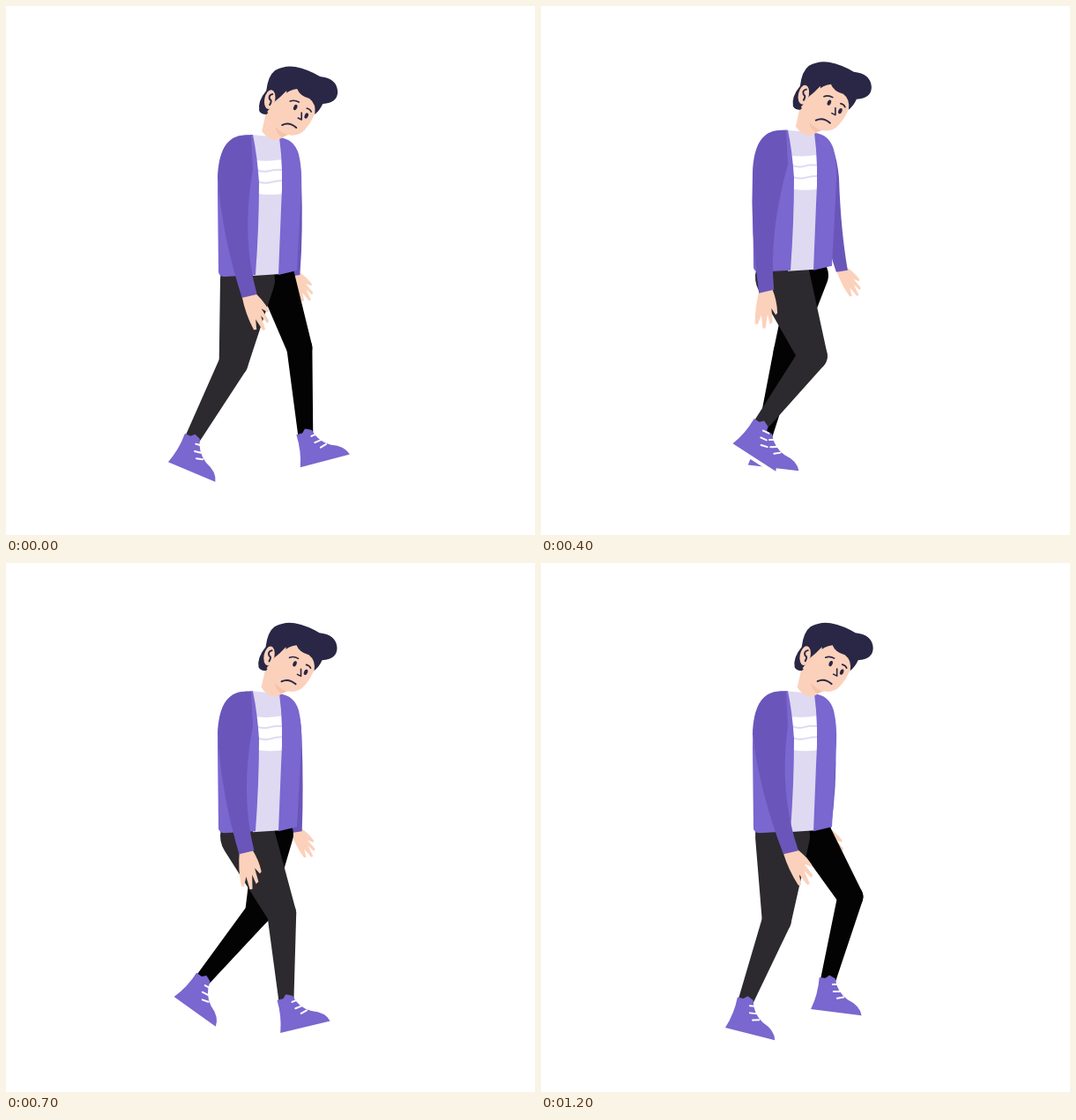
An HTML page with a canvas for the animation above (1300 ms loop, 600 by 600 pixels).

```html
<!DOCTYPE html>
<html lang="en">
<head>
<meta charset="utf-8">
<title>Weary walk</title>
<style>
html, body { margin: 0; width: 100%; height: 100%; overflow: hidden; background: #fff; }
canvas { display: block; }
</style>
</head>
<body>
<canvas id="stage" width="600" height="600"></canvas>
<script>
const ctx = document.getElementById('stage').getContext('2d');
const SKIN = '#fbd1bb', HAIR = '#292745', COAT = '#7a67cf', SLEEVE = '#6a56ba',
  SHIRT = '#dfdaf2', WHITE = '#fff';
const STEPS = 13, STEP_MS = 100, RAD = Math.PI / 180;

// Key angles of the limbs from the vertical, forward positive, at these steps of the cycle
const TIMES = [0, 3, 5, 6, 8, 10, 12];
const NEAR = {
  color: '#2c2a2e', hipR: 31, kneeR: 16.5, thigh: 96, shin: 99,
  thighKeys: [-9.5, 9, 32.5, 32, 15.5, 9, -4],
  shinKeys: [-28.5, -46.5, -21, -1, 2, -10.5, -21]
};
const FAR = {
  color: '#030303', hipR: 22, kneeR: 14.5, thigh: 91, shin: 99,
  thighKeys: [18.5, -7, -25, -27, 5.5, 28, 31],
  shinKeys: [4, -12, -17, -26, -50, -45, -15]
};

// Swings between -1 and 1, highest at the peak step
const swing = (t, peak, cycles = 1) => Math.cos(2 * Math.PI * cycles * (t - peak) / STEPS);

// Periodic cubic through the keys
function sample(keys, t) {
  const n = TIMES.length;
  const time = i => TIMES[(i + n) % n] + STEPS * Math.floor(i / n);
  const key = i => keys[(i + n) % n];
  let i = n - 1;
  while (TIMES[i] > t) i--;
  const span = time(i + 1) - time(i), u = (t - time(i)) / span, v = 1 - u;
  const slope = j => (key(j + 1) - key(j - 1)) / (time(j + 1) - time(j - 1)) * span;
  return key(i) * v * v * (1 + 2 * u) + key(i + 1) * u * u * (3 - 2 * u)
    + slope(i) * u * v * v - slope(i + 1) * u * u * v;
}

function fill(color, d) {
  ctx.fillStyle = color;
  ctx.fill(new Path2D(d));
}

function line(color, width, d) {
  ctx.strokeStyle = color;
  ctx.lineWidth = width;
  ctx.stroke(new Path2D(d));
}

function ellipse(color, x, y, rx, ry, turn) {
  ctx.fillStyle = color;
  ctx.beginPath();
  ctx.ellipse(x, y, rx, ry, turn, 0, Math.PI * 2);
  ctx.fill();
}

function at(x, y, degrees, scale, draw) {
  ctx.save();
  ctx.translate(x, y);
  ctx.rotate(degrees * RAD);
  ctx.scale(scale, scale);
  draw();
  ctx.restore();
}

// Two circles joined by their outer tangents; returns the far end
function limb(color, x, y, r1, degrees, length, r2) {
  const endX = x + length * Math.sin(degrees * RAD);
  const endY = y + length * Math.cos(degrees * RAD);
  const a = (90 - degrees) * RAD, o = Math.acos((r1 - r2) / length);
  ctx.fillStyle = color;
  ctx.beginPath();
  ctx.arc(x, y, r1, a + o, a - o + Math.PI * 2);
  ctx.arc(endX, endY, r2, a - o, a + o);
  ctx.fill();
  return [endX, endY];
}

function shoe() {
  fill(WHITE, 'M-15 33H43V38H-15Z');
  fill(COAT, 'M-10 -3L-3 -3 1 -7 8 -4Q12 11 25 18Q40 23 43 34H-15Q-9 16 -10 -3Z');
  line(WHITE, 2, 'M6 3L13 2M8 11L15 10M13 18L20 16');
}

function leg({ color, hipR, kneeR, thigh, shin, thighKeys, shinKeys }, t, hipX, hipY) {
  const shinTurn = sample(shinKeys, t);
  const knee = limb(color, hipX, hipY, hipR, sample(thighKeys, t), thigh, kneeR);
  const ankle = limb(color, ...knee, kneeR, shinTurn, shin, 8.5);
  // The foot follows the shin, toes slightly raised
  at(...ankle, -1.15 * shinTurn - 10, 1, shoe);
}

function hand() {
  fill(SKIN, `M-7 -4L7 -4Q13 9 14 23L12 25 7 18 9 34 6 36 3 25 1 41 -2 41
    -4 26 -8 37 -11 36Q-12 16 -7 -4Z`);
}

function farArm(t, bob) {
  const x = 329 - 12 * swing(t, 10.2), y = 306 + bob;
  at(x + 1, y, -33, 0.8, hand);
  const edge = 336 + (x - 331) * 0.2;
  fill(SLEEVE, `M318 ${152 + bob}Q334 ${158 + bob} ${edge} ${200 + bob}
    Q${edge + 2} 255 ${x + 7} ${y - 1}L${x - 6} ${y + 1}Q320 260 318 ${200 + bob}Z`);
}

function nearArm(t, bob) {
  const x = 272 + 17 * swing(t, 10.2), y = 330 + bob, bend = (x - 257) * 0.4;
  at(x, y, -15 - 18 * swing(t, 11), 1, hand);
  fill(SLEEVE, `M278 ${147 + bob}C252 ${143 + bob} 241 ${162 + bob} 240 ${195 + bob}
    Q${238 + bend} ${262 + bob} ${x - 8} ${y + 1}L${x + 9} ${y - 3}
    Q${259 + bend} ${262 + bob} 280 ${185 + bob}Z`);
}

function torso() {
  fill(SHIRT, 'M278 146L312 149 316 200 311 304 280 306Z');
  fill(WHITE, 'M283 175Q298 177 313 174L314 213Q300 215 286 213Z');
  line(SHIRT, 2, 'M284 186Q292 189 299 187T314 186M285 199Q293 202 300 200T314 198');
  fill(COAT, `M280 146Q258 145 248 160Q240 176 240 210L241 302Q242 307 248 307L283 305
    Q287 250 287 200Q285 170 280 146Z`);
  fill(COAT, 'M310 149Q327 151 332 168Q336 185 335 206L330 300 309 305 312 230Q315 185 310 149Z');
}

function head() {
  fill(SKIN, 'M294 115L288 142Q299 157 310 150L314 144Z');
  fill('#f6c3a9', 'M303 135Q309 143 318 146L311 149Q304 145 303 135Z');
  fill(SKIN, 'M298 92L316 84 352 106Q349 127 337 140Q329 149 317 146Q303 142 295 122Z');
  fill(HAIR, `M285 119Q283 108 293 96Q295 79 303 73Q314 67 326 69Q341 72 354 80
    Q373 82 374 97Q374 110 357 111Q354 118 348 123Q350 111 342 105Q331 102 328 94
    Q320 94 309 104L304 114 293 123Q287 123 285 119Z`);
  fill(SKIN, 'M309 103L316 96 316 118 299 126 294 120 303 108Z');
  ellipse(SKIN, 297, 106, 6, 11, 0.2);
  line(HAIR, 2, 'M300 100Q295 101 297 106Q300 107 297 112');
  ellipse(HAIR, 326, 115, 2, 3.3, 0.4);
  ellipse(HAIR, 338.5, 124.5, 2, 3.3, 0.4);
  line(HAIR, 1.6, 'M320 108Q325 106 330 109M339 116Q343 117 344 120M333 121L333 129 329 127');
  line(HAIR, 2, 'M311 135Q319 131 327 138');
}

function draw(now) {
  const t = Math.floor(now / STEP_MS) % STEPS;
  // The body sinks once per footfall
  const bob = -3.3 + 3.4 * swing(t, 6.3, 2);
  const lean = 1 + 1.7 * swing(t, 5.7, 2);
  ctx.fillStyle = WHITE;
  ctx.fillRect(0, 0, 600, 600);
  ctx.lineCap = ctx.lineJoin = 'round';
  farArm(t, bob);
  leg(FAR, t, 304, 305 + bob / 2 - 4 * swing(t, 12));
  leg(NEAR, t, 274, 310 + bob / 2);
  at(0, bob, 0, 1, torso);
  at(lean, bob, 0, 1, head);
  nearArm(t, bob);
  requestAnimationFrame(draw);
}
requestAnimationFrame(draw);
</script>
</body>
</html>
```
